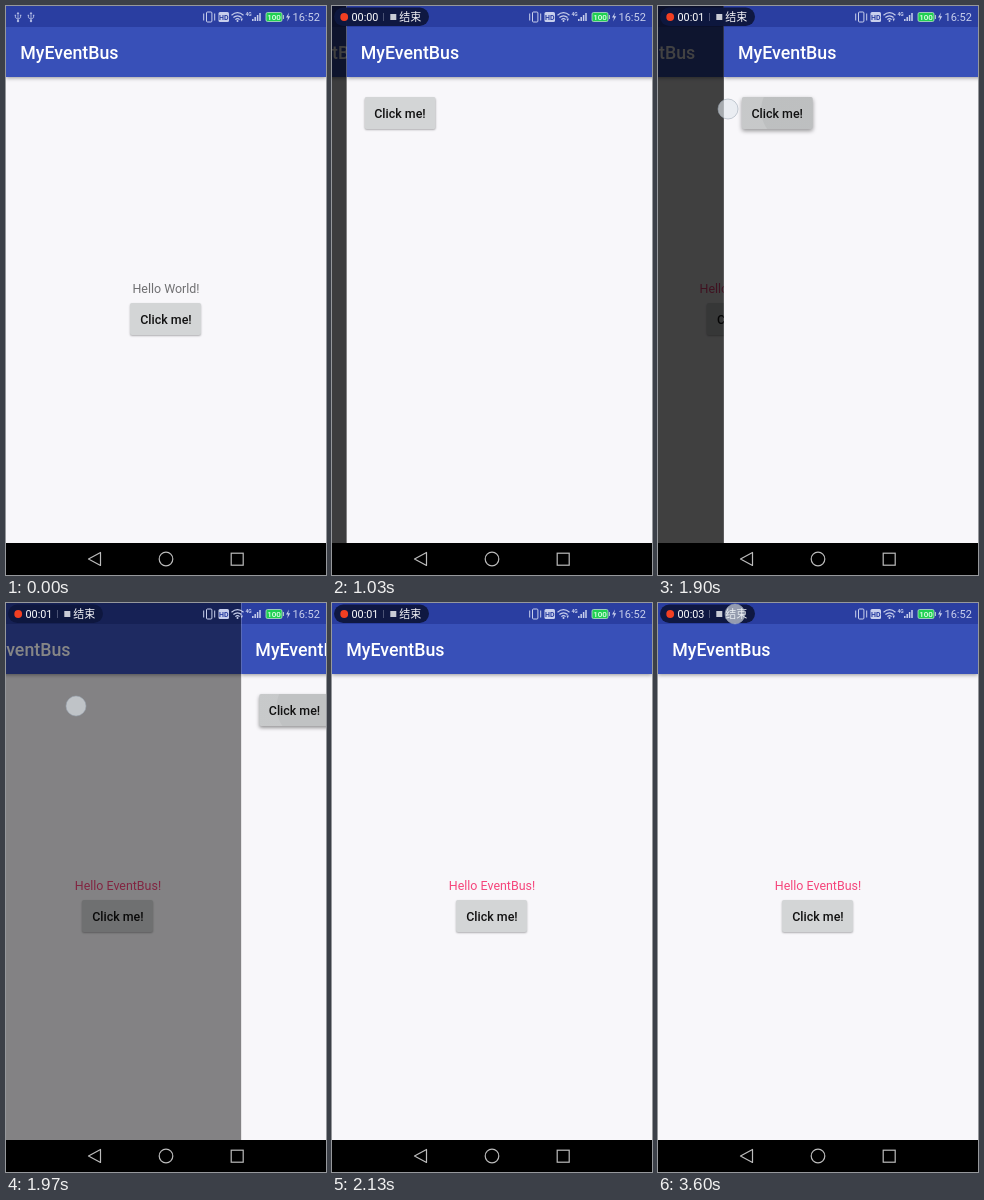
An HTML page that plays this animation: 320 px wide and 569 px high, repeating every 3.63 s.

```html
<!DOCTYPE html>
<html lang="en">
<head>
<meta charset="utf-8">
<style>
html, body { margin: 0; width: 100%; height: 100%; overflow: hidden; background: #000; }
body { position: relative; font-family: Roboto, "Noto Sans", sans-serif; }
div, svg { position: absolute; }
#stage { width: 320px; height: 569px; overflow: hidden; background: #000; }
.page { width: 320px; height: 537px; overflow: hidden; background: #f8f7fa; }
.status { width: 320px; height: 21px; background: #2a3ea1; z-index: 1; }
.bar { top: 21px; width: 320px; height: 50px; background: #3850b8; box-shadow: 0 1px 4px rgba(0,0,0,.4); }
.title { left: 14.2px; top: 0; color: #fff; font: 500 17.78px/52px Roboto, sans-serif; }
.button { width: 71.1px; height: 32px; border-radius: 2px; text-align: center; color: #111;
  font: 500 12.44px/33px Roboto, sans-serif; background: #d3d5d6; }
#hello { top: 273px; width: 320px; text-align: center; font-size: 12.44px; line-height: 20px; }
#dim { width: 320px; height: 537px; background: #000; z-index: 2; }
</style>
</head>
<body>
<div id="stage">
  <div class="page" id="main">
    <div class="status"></div>
    <div class="bar"><div class="title">MyEventBus</div></div>
    <div id="hello"></div>
    <div class="button" id="open" style="left:124.4px;top:296.5px">Click me!</div>
    <div id="dim"></div>
  </div>
  <div class="page" id="second">
    <div class="status"></div>
    <div class="bar"><div class="title">MyEventBus</div></div>
    <div class="button" id="send" style="left:17.8px;top:90.5px">Click me!</div>
  </div>
  <svg width="320" height="569" fill="none" font-family="Roboto, sans-serif">
    <defs>
      <g id="plug" stroke="#aeb8e2" stroke-width=".9">
        <path d="M0-4.5V4M-2.6-1.5V.6L0 2.2L2.6 .6V-1.5"/>
        <path d="M-1.4-3L0-5L1.4-3ZM-3.3-2.3h1.4v1.2h-1.4ZM1.9-2.3h1.4v1.2h-1.4Z" fill="#aeb8e2" stroke="none"/>
        <circle cy="4" r="1.2" fill="#aeb8e2" stroke="none"/>
      </g>
    </defs>
    <g id="plugs"><use href="#plug" x="12" y="11"/><use href="#plug" x="25" y="11"/></g>

    <g stroke="#c8cfec">
      <rect x="200.5" y="6" width="5.4" height="10" rx="1"/>
      <path d="M197.7 7.5v7M208.7 7.5v7"/>
      <path d="M225.5 9.2q6-5 12 0M227.4 11.5q4.1-3.4 8.2 0M229.4 13.6q2.1-1.8 4.2 0" stroke-width="1.2"/>
      <path d="M246.8 15v-2M249.2 15v-4M251.6 15v-6M254 15v-8" stroke-width="1.5"/>
    </g>
    <g fill="#c8cfec">
      <circle cx="231.5" cy="15" r="1"/>
      <path d="M234.5 12.5l1.2 3 1.2-3z"/>
      <rect x="212.5" y="6" width="10.5" height="10" rx="1.5"/>
      <text x="217.8" y="13.5" font-size="7" font-weight="700" text-anchor="middle" fill="#2a3ea1">HD</text>
      <text x="239.5" y="10" font-size="5" font-weight="700">4G</text>
      <path d="M283 6.5l-3 5h2l-.8 4 3-5.2h-2z"/>
      <text x="286.5" y="15" font-size="11">16:52</text>
    </g>
    <rect x="260" y="6.5" width="16" height="9" rx="1.5" fill="#20d052" stroke="#b6dfc7" stroke-width=".8"/>
    <path d="M277.4 9v4" stroke="#b6dfc7"/>
    <text x="268" y="13.9" font-size="8" font-weight="500" text-anchor="middle" fill="#eafff0">100</text>

    <g id="pill">
      <rect x="2" y="1.5" width="95" height="18.5" rx="9.2" fill="#0e173f" fill-opacity=".96"/>
      <circle cx="12.2" cy="11" r="3.9" fill="#f23f22"/>
      <text id="clock" x="19.5" y="15" font-size="10.8" fill="#fff"></text>
      <path d="M51.5 7v8" stroke="#4a5274"/>
      <rect x="58.3" y="8" width="6" height="6" fill="#c9ccd6"/>
      <text x="67.3" y="15.2" font-size="11" fill="#f2f2f6" font-family="'Noto Sans CJK SC', 'Noto Sans CJK', sans-serif">结束</text>
    </g>

    <path d="M94.5 546.5v13l-12-6.5z" stroke="#bcbcbc" stroke-width="1.2" stroke-linejoin="round"/>
    <circle cx="160" cy="553" r="6.8" stroke="#bcbcbc" stroke-width="1.2"/>
    <rect x="225.2" y="547.2" width="12" height="12" stroke="#bcbcbc" stroke-width="1.2"/>
    <circle id="touch" r="10" fill="#e2e8ee" fill-opacity=".64" stroke="#9ca6b2" stroke-opacity=".55"/>
  </svg>
</div>
<script>
const LOOP = 3630;
const el = id => document.getElementById(id);
const ramp = (t, a, b) => Math.min(1, Math.max(0, (t - a) / (b - a)));
const smoother = p => p * p * p * (p * (6 * p - 15) + 10);

// cubic-bezier(.4, 0, .2, 1), solved by bisection
function standard(p) {
  let lo = 0, hi = 1, u = p;
  for (let i = 0; i < 24; i++) {
    u = (lo + hi) / 2;
    const x = 1.2 * u * (1 - u) ** 2 + .6 * u * u * (1 - u) + u ** 3;
    if (x < p) lo = u; else hi = u;
  }
  return p <= 0 ? 0 : p >= 1 ? 1 : u * u * (3 - 2 * u);
}

// x, y, then times: fade in from/to, fade out from/to
const taps = [
  [173, 311, 400, 480, 760, 900],
  [70, 103, 1470, 1540, 1990, 2110],
  [77, 11, 3550, 3590, 4000, 4100]
];

function lift(button, k) {
  button.style.boxShadow =
    `0 ${1 + k}px ${2 + 2 * k}px rgba(0,0,0,${.3 + .1 * k})`;
}

function draw(t) {
  const opened = standard(ramp(t, 810, 1110));
  const closing = ramp(t, 1830, 2130);
  const page = t < 1500 ? 320 * (1 - opened) : 320 * standard(closing);
  const back = t < 1500 ? opened : 1 - smoother(ramp(t, 1843, 2130));
  el('second').style.transform = `translateX(${page}px)`;
  el('second').style.visibility = page < 320 ? 'visible' : 'hidden';
  el('main').style.transform = `translateX(${-80 * back}px)`;
  el('dim').style.opacity = .79 * back;

  const changed = t >= 1800;
  el('hello').textContent = changed ? 'Hello EventBus!' : 'Hello World!';
  el('hello').style.color = changed ? '#f5467c' : '#707072';

  lift(el('open'), ramp(t, 400, 530) - ramp(t, 720, 860));
  const press = ramp(t, 1470, 1600) - ramp(t, 1960, 2100);
  lift(el('send'), press);
  const r = 14 + 20 * ramp(t, 1600, 1930);
  const shade = a => `rgba(0,0,0,${a * press})`;
  el('send').style.backgroundImage =
    `radial-gradient(circle at 52px 13px, ${shade(.1)} ${r}px, ${shade(.06)} ${r + 1}px)`;

  const shown = ramp(t, 20, 170);
  el('pill').style.opacity = shown;
  el('plugs').style.opacity = 1 - shown;
  el('clock').textContent = '00:0' + [1470, 2370, 3370].filter(s => t >= s).length;

  const tap = taps.find(([, , a, , , d]) => t >= a && t < d);
  el('touch').style.opacity = 0;
  if (tap) {
    const [x, y, a, b, c, d] = tap;
    el('touch').setAttribute('transform', `translate(${x} ${y})`);
    el('touch').style.opacity = ramp(t, a, b) - ramp(t, c, d);
  }
}

const start = performance.now();
function frame() {
  draw((performance.now() - start) % LOOP);
  requestAnimationFrame(frame);
}
frame();
</script>
</body>
</html>
```
